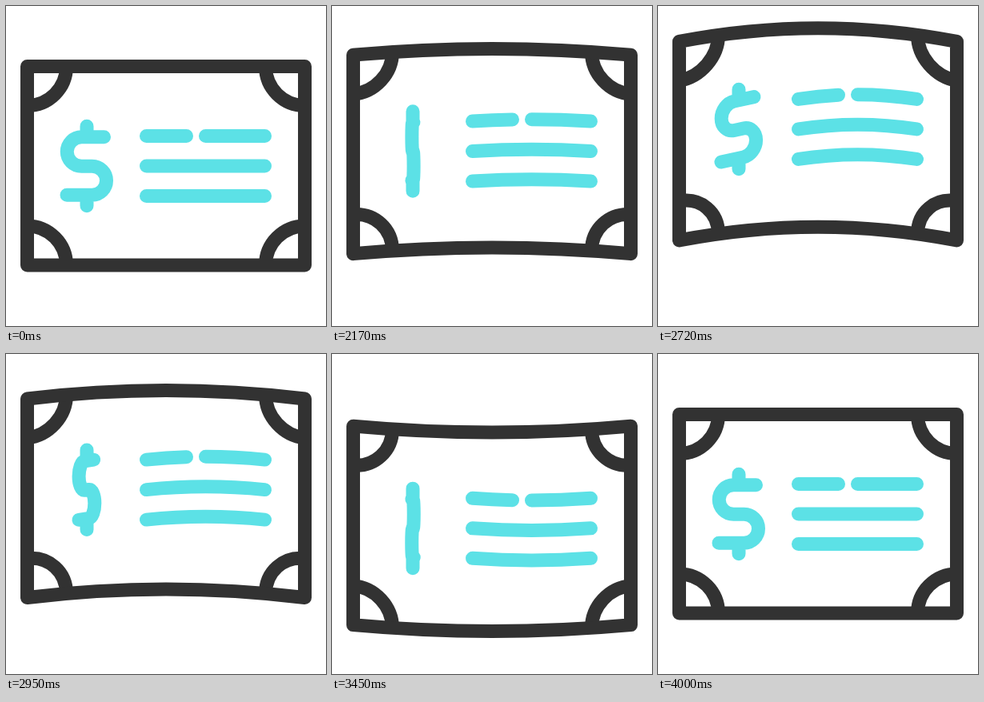
An HTML page that plays this animation: 400 by 400 pixels, repeating every 4.02 s.

```html
<!DOCTYPE html>
<html lang="en">
<head>
<meta charset="utf-8">
<title>Waving banknote</title>
<style>
  html, body { margin: 0; width: 100%; height: 100%; overflow: hidden; background: #fff; }
  svg { display: block; width: 100%; height: 100%; }
  path { fill: none; stroke-width: 17; stroke-linecap: round; stroke-linejoin: round; }
  #bill, #corners { stroke: #323232; }
  #corners { stroke-linecap: butt; }
  #lines, #dollar { stroke: #5ce1e6; }
  #dollar { vector-effect: non-scaling-stroke; }
</style>
</head>
<body>
<svg viewBox="0 0 400 400">
  <path id="corners"/>
  <path id="bill"/>
  <path id="lines"/>
  <path id="dollar" d="M0-50V-36.5M21.5-36.5H-6.5a18 18 0 0 0 0 36.5H6.5a18 18 0 0 1 0 36H-25M0 36V49.5"/>
</svg>
<script>
const LOOP = 4020, START = 2000, HOLD = 2020, END = 4000;
const LEFT = 26.5, RIGHT = 373.5, TOP = 75.5, BOTTOM = 324;
const RADIUS = 49, KAPPA = 0.5523;

// [ms, value] keys: vertical sway in pixels, coin-like turn in degrees
const SWAY = [[0, 0], [20, -0.5], [300, -40], [500, -46], [700, -48], [1070, -16],
  [1120, -8], [1450, 22.5], [1530, 24], [2000, 0]];
const TURN = [[0, 0], [20, 11], [300, 149], [700, 323], [1100, 487], [1430, 622], [2000, 720]];

const byId = id => document.getElementById(id);
const draw = (id, d) => byId(id).setAttribute('d', d);
const pt = (x, y) => `${x.toFixed(2)} ${y.toFixed(2)}`;

function slopeAt(keys, i) {
  if (i === 0 || i === keys.length - 1) return 0;
  const rate = j => (keys[j + 1][1] - keys[j][1]) / (keys[j + 1][0] - keys[j][0]);
  const a = rate(i - 1), b = rate(i);
  return a * b <= 0 ? 0 : 2 * a * b / (a + b);
}

// Smooth interpolation that never overshoots its keys
function sample(keys, t) {
  if (t <= 0) return keys[0][1];
  const i = keys.findIndex(key => key[0] >= t) - 1;
  if (i < 0) return keys[keys.length - 1][1];
  const [t0, v0] = keys[i], [t1, v1] = keys[i + 1];
  const span = t1 - t0, u = (t - t0) / span, w = 1 - u;
  return v0 * w * w * (1 + 2 * u) + v1 * u * u * (3 - 2 * u)
    + span * u * w * (w * slopeAt(keys, i) - u * slopeAt(keys, i + 1));
}

// Horizontal stroke from x0 to x1 following the parabola y + bend(x)
function bentLine(x0, x1, y, bend, join = 'M') {
  const a = bend(x0), b = bend(x1), m = (x0 + x1) / 2;
  return `${join}${pt(x0, y + a)}Q${pt(m, y + 2 * bend(m) - (a + b) / 2)} ${pt(x1, y + b)}`;
}

function cornerArc(x, y, dx, dy, bend) {
  const at = (u, v) => {
    const px = x + dx * u * RADIUS;
    return pt(px, y + dy * v * RADIUS + bend(px));
  };
  return `M${at(0, 1)}C${at(KAPPA, 1)} ${at(1, KAPPA)} ${at(1, 0)}`;
}

function render(time) {
  const t = time < HOLD || time >= END ? 0 : time - START;
  const sway = sample(SWAY, t);
  const billBend = x => sway * (1 - 0.35 * ((x - 200) / 173.5) ** 2);

  draw('bill', bentLine(LEFT, RIGHT, TOP, billBend)
    + bentLine(RIGHT, LEFT, BOTTOM, billBend, 'L') + 'Z');
  draw('corners', [[LEFT, 1], [RIGHT, -1]].map(([x, dx]) =>
    cornerArc(x, TOP, dx, 1, billBend) + cornerArc(x, BOTTOM, dx, -1, billBend)).join(''));

  // The printed parts trail the paper slightly
  const inner = sample(SWAY, t - 15);
  const shift = inner * (inner < 0 ? 0.96 : 0.81);
  const lineBend = x => shift + 0.12 * inner * (1 - ((x - 249.5) / 74) ** 2);
  draw('lines', bentLine(175.5, 225.5, 162.5, lineBend) + bentLine(249.5, 323.5, 162.5, lineBend)
    + bentLine(175.5, 323.5, 200, lineBend) + bentLine(175.5, 323.5, 237.5, lineBend));

  const flip = Math.cos(sample(TURN, t) * Math.PI / 180);
  const tilt = 0.0045 * inner * flip;
  byId('dollar').setAttribute('transform',
    `matrix(${flip.toFixed(4)} ${tilt.toFixed(4)} 0 1 101 ${(200.3 + shift).toFixed(2)})`);
}

const began = performance.now();
function tick() {
  render((performance.now() - began) % LOOP);
  requestAnimationFrame(tick);
}
tick();
</script>
</body>
</html>
```
